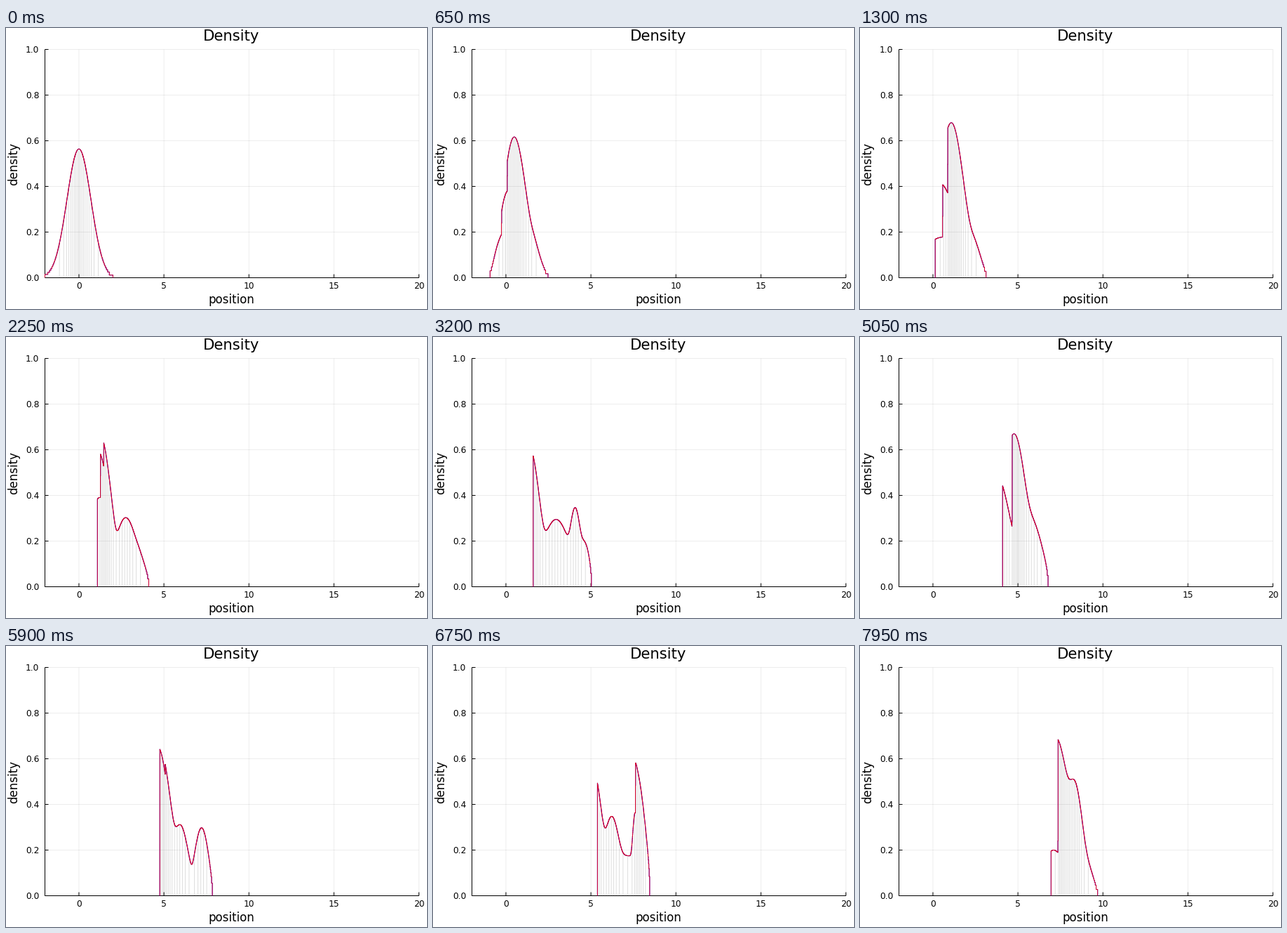
Recreate the animation shown at these times as a matplotlib script. Size 600x400 px, loop 8000 ms.

```python
import numpy as np
import matplotlib.pyplot as plt
from matplotlib.animation import FuncAnimation

W, H, DPI = 600, 400, 100
FRAMES, STEP = 160, 50
CELLS, STRIDE = 400, 20
X0, X1, Y0, Y1 = 55.5, 588.5, 355.5, 30.5   # plot box in pixels
PX = 72 / DPI                               # one pixel in points
BEAT = 1.7                                  # seconds between changes of speed

plt.rcParams["font.family"] = "DejaVu Sans"


def px(x):
    return X0 + (x + 2) * (X1 - X0) / 22


def py(rho):
    return Y0 - rho * (Y0 - Y1)


def track(t, every, values):
    return np.interp(t, np.arange(len(values)) * every, values)


def left_end(t):
    return track(t, BEAT, [-2, .79, 1.71, 4.17, 5.42, 7.68])


def right_end(t):
    return track(t, BEAT / 2, [2, 2.62, 3.57, 4.4, 5.22, 5.84, 6.83, 7.91, 8.49, 9.19, 10.6])


def bump(x, centre, height, width, start=-9):
    """Gaussian hump that sets in abruptly at `start`."""
    return np.where(x >= start, height * np.exp(-((x - centre) / width) ** 2), 0)


def profile(t, *bumps):
    """Time, scaled quantiles and area of softly merged humps."""
    s = np.linspace(0, 1, 4000)
    a, b = left_end(t), right_end(t)
    x = a + s * (b - a)
    rho = sum(bump(x, *p) ** 4 for p in bumps) ** .25
    rho = rho * np.sqrt(1 - .9 * s ** 25)
    mass = np.append(0, np.cumsum((rho[1:] + rho[:-1]) / 2)) * (x[1] - x[0])
    return t, np.interp(np.linspace(0, mass[-1], CELLS + 1), mass, s), mass[-1]


KEYS = [
    profile(0, (0, .5642, 1)),
    profile(1.3, (.6, .178, 2), (.4, .41, 1.4, .57), (1.1, .67, 1.03, .87), (2.3, .17, .65)),
    profile(2.55, (1.1, .7, 1.05), (3.1, .26, 1.1)),
    profile(3.2, (1.4, .607, .85), (2.95, .295, 1.2), (4.07, .345, .5), (4.6, .2, .6)),
    profile(4, (2.93, .3, 1.25), (4.08, .43, .48), (4.6, .25, .6), (5.12, .5, .45)),
    profile(5.05, (3.7, .494, 1.2), (4.78, .668, 1.03, 4.66), (5.8, .285, .9)),
    profile(5.95, (4.7, .67, 1), (6, .3, .7), (7.3, .3, .6)),
    profile(6.75, (5.1, .56, .8), (6.22, .345, .7), (7.1, .175, 2), (7.6, .36, .25), (7.6, .56, .8, 7.62)),
    profile(7.95, (7.1, .2, 1), (7.2, .695, 1.23, 7.36), (8.32, .49, .72), (9, .14, .6)),
]
TIMES = [k[0] for k in KEYS]


def state(t):
    """Cell borders and the density in each cell at time t."""
    k = min(np.searchsorted(TIMES, t, side="right") - 1, len(KEYS) - 2)
    (t0, s0, a0), (t1, s1, a1) = KEYS[k:k + 2]
    u = (t - t0) / (t1 - t0)
    s = (1 - u) * s0 + u * s1
    a, b = left_end(t), right_end(t)
    x = a + s * (b - a)
    return x, ((1 - u) * a0 + u * a1) / (CELLS * np.diff(x))


fig = plt.figure(figsize=(W / DPI, H / DPI), dpi=DPI, facecolor="white")
ax = fig.add_axes([0, 0, 1, 1], xlim=(0, W), ylim=(H, 0))
ax.axis("off")


def line(xs=(), ys=(), color="black", **kw):
    return ax.plot(xs, ys, color=color, lw=PX, snap=False, solid_capstyle="butt", **kw)[0]


def label(x, y, text, size, ha="center", **kw):
    ax.text(x, y, text, fontsize=size * PX, ha=ha, va="baseline", **kw)


for v in range(0, 21, 5):
    line([px(v)] * 2, [Y0, Y1], alpha=.07)
    line([px(v)] * 2, [Y0, Y0 - 5])
    label(px(v), 371.4, str(v), 12.2)
for v in np.linspace(0, 1, 6):
    line([X0, X1], [py(v)] * 2, alpha=.07)
    line([X0, X0 + 5], [py(v)] * 2)
    label(47.5, py(v) + 4.7, f"{v:.1f}", 12.2, ha="right")
line([X0, X0, X1], [Y1, Y0, Y0])

label(321, 18.3, "Density", 21.2)
label(321.5, 392, "position", 16.6)
label(16.3, 193, "density", 16.6, rotation=90, rotation_mode="anchor")

bars = ax.vlines(np.zeros(CELLS // STRIDE), 0, 0, color="black", alpha=.16, lw=.8 * PX)
bars.set_snap(False)
blue = line(color="blue")
red = line(color="red", alpha=.85)


def draw(i):
    x, rho = state(i * STEP / 1000)
    xs = px(np.repeat(x, 2))
    ys = py(np.concatenate([[0], np.repeat(rho, 2), [0]]))
    blue.set_data(xs, ys)
    red.set_data(xs, ys)
    tops = zip(px(x[:-1:STRIDE]), py(rho[::STRIDE]))
    bars.set_segments([[(a, Y0), (a, b)] for a, b in tops])
    return bars, blue, red


anim = FuncAnimation(fig, draw, frames=FRAMES, interval=STEP, repeat=True, repeat_delay=0)
plt.show()
```
